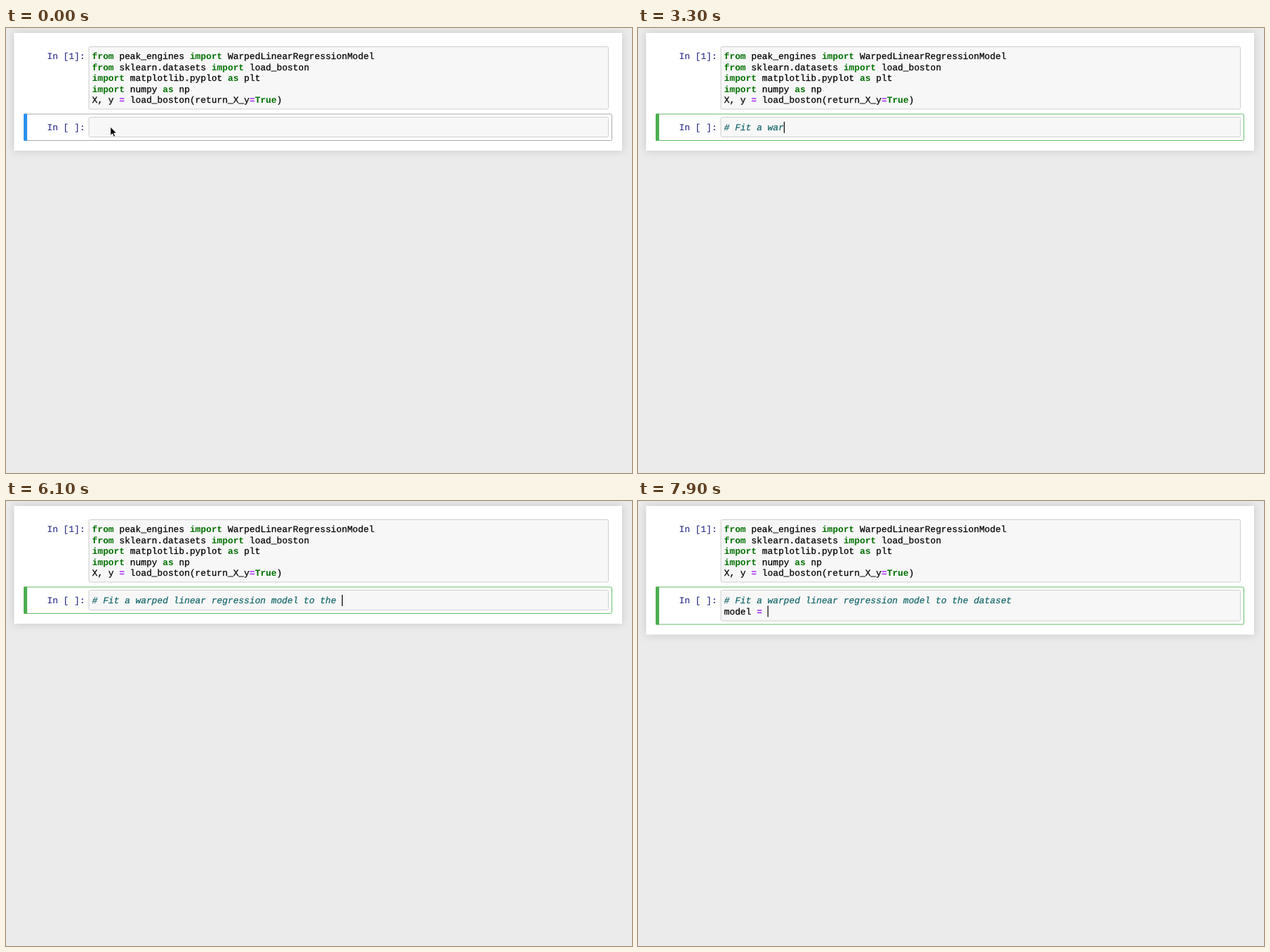
These frames come from a looping animation (887x631 px, 8000 ms). An HTML page:

```html
<!DOCTYPE html>
<html lang="en">
<head>
<meta charset="utf-8">
<title>Notebook typing</title>
<style>
  html, body { margin: 0; width: 100%; height: 100%; overflow: hidden; background: #ebebeb; }
  svg { display: block; width: 100%; height: 100%; }
  text {
    font: 12.82px "Liberation Mono", "Courier New", monospace;
    text-rendering: geometricPrecision;
    white-space: pre;
    fill: #000; stroke: #000; stroke-width: .25px;
  }
  .prompt { fill: #2a2f86; stroke: #2a2f86; stroke-width: .15px; }
  .k { fill: #007000; stroke: none; font-weight: bold; }
  .o { fill: #a020f5; stroke: none; font-weight: bold; }
  .comment { fill: #17686b; stroke: #17686b; font-style: italic; }
  .panel { fill: #fff; filter: drop-shadow(0 0 6px rgba(87, 87, 87, .25)); }
  .input { fill: #f7f7f7; stroke: #cfcfcf; }
  #frame { fill: #fff; stroke: #ababab; }
  #bar { fill: #2b92f0; }
  .edit #frame { stroke: #66bb6a; }
  .edit #bar { fill: #4caf50; }
</style>
</head>
<body>
<svg id="stage" viewBox="0 0 887 631">
  <rect id="panel" class="panel" x="11.5" y="7" width="861.5" height="167"/>

  <rect class="input" x="117.5" y="26.5" width="736" height="88.5" rx="2"/>
  <text class="prompt" x="58.3" y="44">In [1]:</text>
  <text x="122" y="44"><tspan class="k">from</tspan> peak_engines <tspan class="k">import</tspan> WarpedLinearRegressionModel</text>
  <text x="122" y="59.6"><tspan class="k">from</tspan> sklearn.datasets <tspan class="k">import</tspan> load_boston</text>
  <text x="122" y="75.1"><tspan class="k">import</tspan> matplotlib.pyplot <tspan class="k">as</tspan> plt</text>
  <text x="122" y="90.7"><tspan class="k">import</tspan> numpy <tspan class="k">as</tspan> np</text>
  <text x="122" y="106.2">X, y <tspan class="o">=</tspan> load_boston(return_X_y<tspan class="o">=</tspan><tspan class="k">True</tspan>)</text>

  <rect id="frame" x="25.5" y="122" width="833" height="37.5" rx="2"/>
  <rect id="bar" x="25" y="121.5" width="5" height="38.5" rx="1"/>
  <rect id="input" class="input" x="117.5" y="126.5" width="736" height="28" rx="2"/>
  <text class="prompt" x="58.3" y="145">In [ ]:</text>
  <text id="comment" class="comment" x="122" y="145"></text>
  <text x="122" y="160.5"><tspan id="name"></tspan><tspan id="op" class="o"></tspan></text>
  <rect id="caret" width="1.2" height="16"/>

  <path id="arrow" d="M148 140.2v12.2l2.8-2.6 1.9 4.4 2-.9-1.9-4.2h3.8z" stroke="#fff" stroke-width=".8"/>
  <path id="beam" d="M144.8 135.5q3.2 0 3.4 1.6q.2-1.6 3.4-1.6M148.2 137v10.5M144.8 149q3.2 0 3.4-1.6q.2 1.6 3.4 1.6M146.4 142.8h3.6" fill="none" stroke="#111" stroke-width="1.2"/>
</svg>
<script>
  const LOOP = 8000, STEP = 100, CHAR = 7.692, LINE = 15.5;
  const COMMENT = "# Fit a warped linear regression model to the dataset";
  const NAME = "model ", OP = "= ";
  // [time, characters typed], linear between points; the line break counts as one
  const TYPING = [
    [2200, 0], [2300, 1], [2400, 2], [2700, 2], [3100, 10], [3200, 10],
    [3300, 11], [4300, 22], [4600, 26], [4700, 26], [5200, 33], [5300, 33],
    [5400, 35], [6100, 46], [6200, 46], [6600, 53], [7100, 53], [7200, 54], [7900, 62]
  ];
  const $ = id => document.getElementById(id);
  const show = (id, on) => $(id).setAttribute("visibility", on ? "visible" : "hidden");
  const within = (t, from, to) => t >= from && t < to;

  function typedAt(t) {
    if (t <= TYPING[0][0]) return 0;
    const i = TYPING.findIndex(p => p[0] >= t);
    if (i < 0) return TYPING[TYPING.length - 1][1];
    const [t0, n0] = TYPING[i - 1], [t1, n1] = TYPING[i];
    return Math.round(n0 + (n1 - n0) * (t - t0) / (t1 - t0));
  }

  function draw(t) {
    const typed = typedAt(t);
    const row = typed > COMMENT.length ? 1 : 0;
    const col = row ? typed - COMMENT.length - 1 : typed;
    const grow = row * LINE;

    $("comment").textContent = COMMENT.slice(0, typed);
    $("name").textContent = row ? NAME.slice(0, col) : "";
    $("op").textContent = row ? OP.slice(0, Math.max(0, col - NAME.length)) : "";

    $("panel").setAttribute("height", 167 + grow);
    $("frame").setAttribute("height", 37.5 + grow);
    $("bar").setAttribute("height", 38.5 + grow);
    $("input").setAttribute("height", 28 + grow);
    $("caret").setAttribute("x", 122 + col * CHAR);
    $("caret").setAttribute("y", 133 + grow);

    $("stage").classList.toggle("edit", t >= 600);
    show("arrow", t < 300);
    show("beam", within(t, 300, 2300));
    show("caret", within(t, 1100, 1700) || within(t, 2300, 7100) || t >= 7200);
  }

  function tick() {
    const t = performance.now() % LOOP;
    draw(Math.floor(t / STEP) * STEP);
    requestAnimationFrame(tick);
  }
  tick();
</script>
</body>
</html>
```
